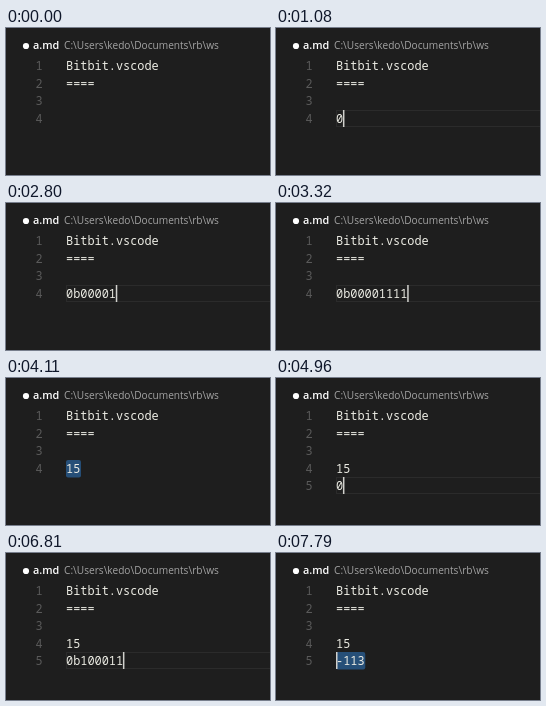
Recreate the animation shown at these times as an HTML page. Size 264 px wide and 147 px high, loop 8000 ms.

```html
<!DOCTYPE html>
<html lang="en">
<head>
<meta charset="utf-8">
<style>
  html, body { margin: 0; width: 100%; height: 100%; overflow: hidden; background: #1e1e1e; }
  svg { display: block; width: 264px; height: 147px; }
  text { font: 500 11.9px "Noto Sans Mono", monospace; fill: #ecece4; white-space: pre; }
  .title { font: 600 10.8px "Open Sans", sans-serif; fill: #fff; }
  .path { font: 10.15px "Open Sans", sans-serif; fill: #a4a4a4; }
  .number { font-weight: 400; fill: #5a5a5a; }
</style>
</head>
<body>
<svg viewBox="0 0 264 147">
  <circle cx="20" cy="18" r="3.1" fill="#fff"/>
  <text class="title" x="27" y="21">a.md</text>
  <text class="path" x="58" y="21">C:\Users\kedo\Documents\rb\ws</text>
  <text class="number" x="29.4" y="42">1</text>
  <text class="number" x="29.4" y="60">2</text>
  <text class="number" x="29.4" y="77">3</text>
  <text class="number" x="29.4" y="95">4</text>
  <text class="number" x="29.4" y="112" id="five">5</text>
  <text x="60" y="42">Bitbit.vscode</text>
  <text x="60" y="60">====</text>
  <rect id="outline" width="210" height="16" fill="none" stroke="#2b2b2b"/>
  <rect id="selection" height="17.5" rx="2" fill="#264f78"/>
  <text id="line4" x="60" y="95"></text>
  <text id="line5" x="60" y="112"></text>
  <rect id="caret" width="1.5" height="17" fill="#d0d0cc"/>
</svg>
<script>
const LOOP = 8000, LEFT = 60, CHAR = 7.14;
const el = id => document.getElementById(id);
const [five, outline, selection, line4, line5, caret] =
  ['five', 'outline', 'selection', 'line4', 'line5', 'caret'].map(el);

// Each step: start time, line being edited, its text, caret shown, text selected.
const steps = [];
const step = (time, line, text, shown = true, selected = false) =>
  steps.push({ time, line, text, shown, selected });
const type = (line, text, firstLength, times) =>
  times.forEach((time, i) => step(time, line, text.slice(0, firstLength + i)));

const first = '0b00001111', second = '0b10001111';
step(0, 4, '', false);
step(300, 4, '');
step(760, 4, '', false);
type(4, first, 1, [1080, 1150, 1540, 1740, 1940]);
step(2400, 4, '0b000', false);
type(4, first, 6, [2590, 2790, 2990, 3190, 3320]);
step(3650, 4, '15', true, true);
step(4110, 4, '15', false, true);
step(4300, 4, '15');
step(4570, 5, '');
type(5, second, 1, [4960, 5030, 5420, 5690, 5810, 6010]);
step(6470, 5, '0b1000', false);
type(5, second, 7, [6660, 6810, 7000, 7130]);
step(7260, 5, second, true, true);
step(7460, 5, '143', true, true);
step(7790, 5, '-113', true, true);

function place(rect, x, y, visible) {
  rect.setAttribute('x', x);
  rect.setAttribute('y', y);
  rect.style.display = visible ? '' : 'none';
}

let current;
function draw(now) {
  const time = now % LOOP;
  const state = steps.findLast(s => s.time <= time);
  if (state !== current) {
    current = state;
    const { line, text, shown, selected } = state;
    const width = text.length * CHAR;
    const top = Math.round(29.4 + 17.5 * (line - 1));
    line4.textContent = line === 4 ? text : '15';
    line5.textContent = line === 5 ? text : '';
    five.style.display = line === 5 ? '' : 'none';
    selection.setAttribute('width', width + 0.7);
    place(selection, LEFT, top, selected);
    place(outline, LEFT + 0.5, top + 0.5, text && !selected);
    place(caret, LEFT + (selected ? 0 : width - 0.2), top, shown);
  }
  requestAnimationFrame(() => draw(performance.now() - start));
}
const start = performance.now();
draw(0);
</script>
</body>
</html>
```
